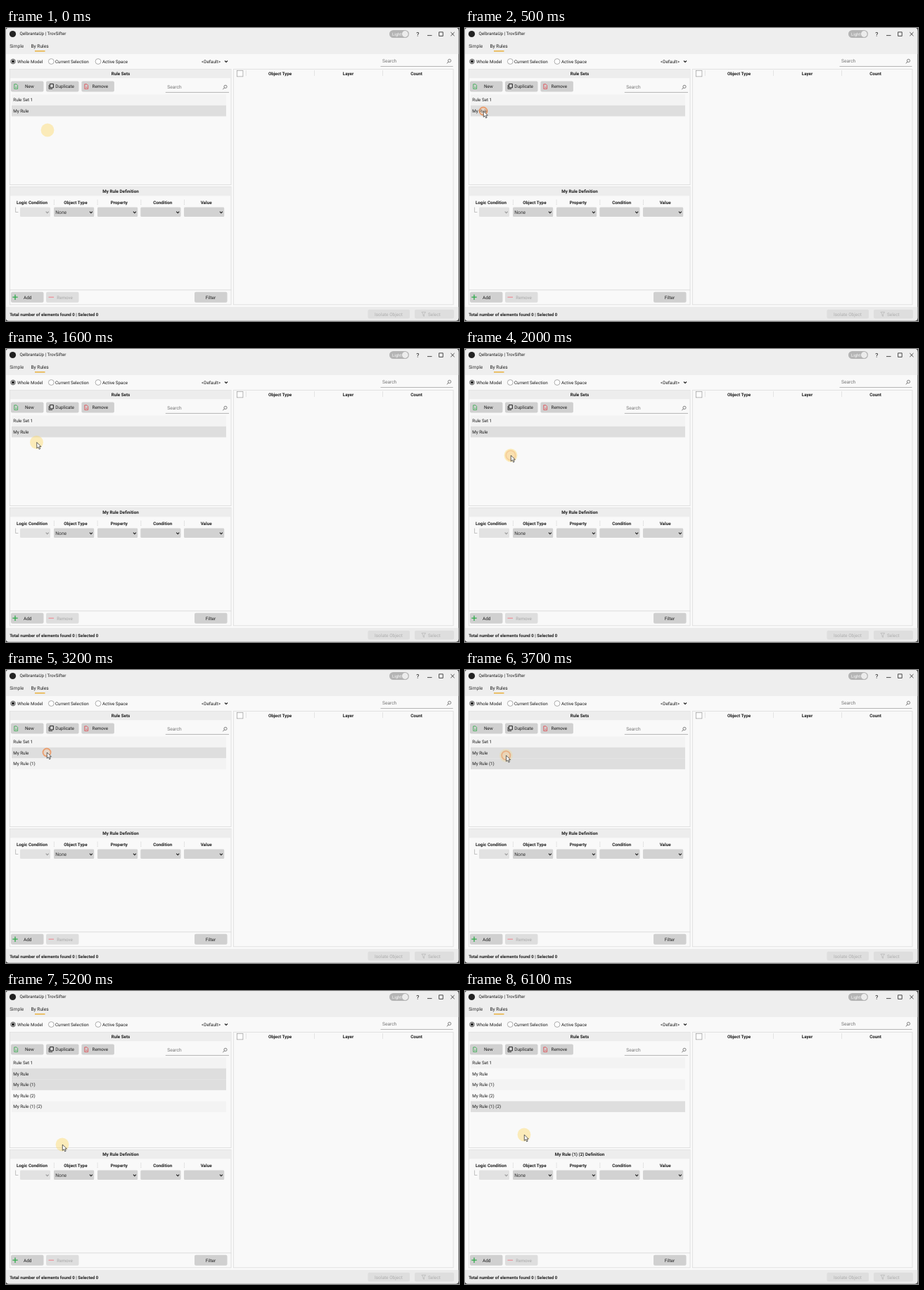
An HTML page that plays this animation: 644x416 px, repeating every 6.9 s.

```html
<!DOCTYPE html>
<html lang="en">
<head>
<meta charset="utf-8">
<title>Rule sets</title>
<style>
html, body { margin: 0; width: 100%; height: 100%; overflow: hidden; background: #4a4a4a; }
svg { display: block; font: 6.25px Roboto, sans-serif; text-rendering: geometricPrecision; white-space: pre; }
</style>
</head>
<body>
<svg id="stage" width="644" height="416" viewBox="0 0 644 416"></svg>
<script>
const stage = document.getElementById('stage');

const rect = (x, y, w, h, fill, more = '') =>
  `<rect x="${x}" y="${y}" width="${w}" height="${h}" fill="${fill}" ${more}/>`;
const path = (d, color = '#222', width = 0.8, more = '') =>
  `<path d="${d}" fill="none" stroke="${color}" stroke-width="${width}" ${more}/>`;
const circle = (x, y, r, fill, more = '') =>
  `<circle cx="${x}" cy="${y}" r="${r}" fill="${fill}" ${more}/>`;
const text = (x, y, s, more = '') =>
  `<text x="${x}" y="${y}" fill="#1c1c1c" ${more}>${s}</text>`;
const head = (x, y, s) => text(x, y, s, 'text-anchor="middle" font-weight="700"');
const label = (x, y, s, color = '#1c1c1c', size = 6.4) =>
  text(x, y, s, `style="fill:${color};font-size:${size}px"`);
const frame = (x, y, w, h) =>
  rect(x, y, w, h, '#f9f9f9', 'stroke="#dcdcdc" stroke-width=".8"');
const button = (x, y, w = 46.5, h = 15, fill = '#d0d0d0', more = '') =>
  rect(x, y, w, h, fill, 'rx="2" ' + more);
const divider = (x, y) => path(`M${x} ${y}v8`, '#c4c4c4', 0.8, 'stroke-dasharray="1 1"');
const chevron = (x, y, color = '#222') => path(`M${x - 2} ${y - 1}l2 2l2-2`, color, 1.1);
const radio = (x, on) =>
  circle(x, 47.5, on ? 3.3 : 3.9, '#fff', `stroke="${on ? '#222' : '#999'}" stroke-width=".8"`) +
  (on ? circle(x, 47.5, 2, '#111') : '');
const search = (x, y, end) =>
  label(x + 2.5, y - 5.5, 'Search', '#777', 6.6) +
  path(`M${x} ${y - 0.2}H${end}`, '#999', 0.7) +
  circle(end - 5, y - 8.3, 2.1, 'none', 'stroke="#555" stroke-width=".7"') +
  path(`M${end - 6.5} ${y - 6.8}l-2.2 2.4`, '#555', 0.8);
const sheet = (x, color) =>
  path(`M${x} 79.8h3.2l1.6 1.6v5h-4.8z`, color, 0.8) +
  path(`M${x + 1.4} 84.2h2.2`, color, 0.8);
const dropdown = (x, w, off) =>
  rect(x, 254.6, w, 13.4, off ? '#e2e2e2' : '#d2d2d2', 'rx="1.5"') +
  chevron(x + w - 4.3, 261.6, off ? '#999' : '#222');

const titleBar =
  rect(0, 0, 643.3, 415.6, '#f9f9f9', 'rx="4"') +
  '<path d="M0 37V4a4 4 0 0 1 4-4H639.3a4 4 0 0 1 4 4V37z" fill="#eeeeee"/>' +
  circle(9.5, 8.5, 4.6, '#222') +
  text(19.5, 10.3, 'QelbrantaUp | TrovSifter', 'font-size="6.25"') +
  rect(545, 3, 28, 11, '#b4b4b4', 'rx="5.5"') +
  label(549, 10.6, 'Light', '#f8f8f8', 6) + circle(567.3, 8.5, 4.4, '#ececec') +
  label(583.3, 11.5, '?', '#222', 8.5) +
  path('M599 10.6h6.5M615.6 5.8h5.6v5.6h-5.6zM632.3 6l5.2 5.2m0-5.2l-5.2 5.2');

const tabs =
  label(5.2, 28, 'Simple', '#333', 6.6) + label(35.5, 28, 'By Rules', '#1c1c1c', 6.6) +
  rect(41, 32, 14.5, 1.5, '#e9b13f') +
  radio(10, true) + text(16, 49.8, 'Whole Model') +
  radio(64.3) + text(70, 49.8, 'Current Selection') +
  radio(131) + text(137, 49.8, 'Active Space') +
  label(278, 49.8, '&lt;Default&gt;', '#1c1c1c', 6.4) + chevron(313, 47.5) +
  search(532.5, 54.7, 635.5);

const panels =
  frame(5.5, 58.4, 314.5, 164.2) + rect(5.9, 58.8, 313.7, 12.4, '#ededed') + head(163, 67.2, 'Rule Sets') +
  frame(5.5, 225.4, 314.5, 146.6) + rect(5.9, 225.8, 313.7, 12.6, '#ededed') +
  frame(5.5, 372, 314.5, 20.8) + frame(323.4, 58.4, 312.6, 334.4) +
  rect(328.3, 60.3, 8.6, 8.6, '#fdfdfd', 'stroke="#999" stroke-width=".7"') +
  [[389.5, 'Object Type'], [486.5, 'Layer'], [583.5, 'Count']].map(([x, s]) => head(x, 66.8, s)).join('') +
  [341.3, 438.5, 535.5].map(x => divider(x, 60.5)).join('');

const toolbar =
  button(7, 75.6) + sheet(11.8, '#2faa4a') + label(27, 85.3, 'New') +
  button(57, 75.6, 46.5, 15, '#d0d0d0', 'id="copy"') +
  path('M62.4 79.4h5v5.4h-5z', '#222', 1) + path('M61 81v5.4h5', '#222', 0.8) +
  label(70.3, 85.3, 'Duplicate') +
  button(107.4, 75.6) + sheet(111.8, '#e0434b') + label(122.5, 85.3, 'Remove', '#1c1c1c', 6.3) +
  search(226.8, 91.6, 317);

const columns = ['Logic Condition', 'Object Type', 'Property', 'Condition', 'Value'];
const definition =
  columns.map((s, i) => head(37 + 61.9 * i, 250.3, s) + (i ? divider(6.7 + 61.7 * i, 244) : '')).join('') +
  path('M13.6 254.5v7h3.8', '#aaa', 0.7) + dropdown(20, 43, true) +
  [68, 130, 191.3, 253].map(x => dropdown(x, 57.2)).join('') +
  label(70.3, 263.9, 'None', '#333', 6.7) +
  button(7, 374.8) + path('M9.3 382.2h7.4m-3.7-3.7v7.4', '#2faa4a', 1.3) + label(25, 384.6, 'Add') +
  button(57, 374.8, 46.5, 15, '#dedede') + path('M60.5 382.2h7.5', '#ee8f98', 1.2) +
  label(72.3, 384.6, 'Remove', '#a8a8a8', 6.3) +
  button(268, 374.8) + label(283.8, 384.6, 'Filter');

const statusBar =
  `<path d="M0 396H643.3V411.6a4 4 0 0 1-4 4H4a4 4 0 0 1-4-4z" fill="#ebebeb"/>` +
  text(5.2, 409.2, 'Total number of elements found 0 | Selected 0', 'font-weight="700" font-size="6.1"') +
  button(514.5, 399.8, 59.5, 12.8, '#dedede') + label(524, 408.6, 'Isolate Object', '#aeaeae', 6.5) +
  button(581, 399.8, 56, 12.8, '#dedede') + label(600, 408.6, 'Select', '#aeaeae', 6.4) +
  path('M591 403.3h5.6l-2.2 3v3l-1.4-.9v-2.1z', '#b5b5b5', 0.7);

stage.innerHTML = titleBar + tabs + panels + toolbar + definition + statusBar +
  '<g id="rows"></g><g id="name"></g><g id="pointer"></g>';
const [copy, rows, name, pointer] =
  ['copy', 'rows', 'name', 'pointer'].map(id => document.getElementById(id));

// Pointer stops: time, x, y
const stops = [
  [0, 59, 145], [100, 59, 145], [500, 26, 118], [800, 24, 117], [1200, 22, 114], [1400, 22, 114],
  [1800, 65, 151], [2200, 65, 151], [2700, 86, 86], [2800, 86, 86], [3100, 58, 117], [3200, 58, 117],
  [3500, 57, 133], [3600, 57, 133], [3900, 62, 88], [4200, 62, 165.5], [4600, 62, 165.5],
  [5200, 80, 218], [5600, 72, 165], [5800, 72, 165], [6100, 84, 204], [6900, 84, 204]
];
const clicks = [500, 700, 1800, 2700, 3200, 3600, 3900, 5600];
const names = ['Rule Set 1', 'My Rule', 'My Rule (1)', 'My Rule (2)', 'My Rule (1) (2)'];
const between = (t, a, b) => t >= a && t < b;

function tick(t) {
  const step = n => Math.floor(t / n) * n;
  if (t < 3900) return step(100);
  if (t < 4200) return 3900;
  return t < 6000 ? step(200) : Math.min(step(100), 6100);
}

function pointerAt(t) {
  const i = stops.findIndex(s => s[0] > t);
  const [t0, x0, y0] = stops[i - 1], [t1, x1, y1] = stops[i];
  const p = (t - t0) / (t1 - t0), e = p * p * (3 - 2 * p);
  return [x0 + (x1 - x0) * e, y0 + (y1 - y0) * e];
}

function drawRows(t) {
  const count = t < 2900 ? 2 : t < 4400 ? 3 : 5;
  const picked = t >= 5600 ? [4] : t >= 3600 ? [1, 2] : [1];
  const editing = between(t, 700, 1600);
  rows.innerHTML = names.slice(0, count).map((s, i) => {
    const y = 94.4 + 15.5 * i;
    if (editing && i === 1)
      return rect(8.5, 110.5, 304, 14, '#e2e2e2', 'stroke="#a4a4a4"') +
        rect(10.5, 111.5, 295, 12, '#fff', 'stroke="#8a8a8a"') +
        text(13.3, y + 9.6, s);
    const fill = picked.includes(i) ? '#dedede' : i % 2 ? '#f9f9f9' : '#f3f3f3';
    return rect(8, y, 305, 15.5, fill) + text(10.3, y + 9.6, s);
  }).join('');
  name.innerHTML = head(163, 234.3, (t >= 5600 ? names[4] : names[1]) + ' Definition');
}

function drawPointer(t) {
  const [x, y] = pointerAt(t);
  const age = Math.min(...clicks.filter(c => c <= t).map(c => t - c), 999);
  // A click swaps the halo for a ring, then the halo returns.
  const halo = Math.min(age / 200, 1);
  let s = circle(x, y, 9.4, '#ffd65a', `opacity="${0.4 * halo}"`);
  if (age < 300)
    s += circle(x, y, 5.5 + age / 150, '#f9c79a',
      `fill-opacity=".3" stroke="#ec8a4c" stroke-width="1.8" stroke-opacity="${0.75 - age / 400}"`);
  if (t >= 100)
    s += `<path transform="translate(${x + 0.3} ${y})" d="M0 0v8.4l2-1.8l1.4 3.2l1.5-.7l-1.4-3h2.6z" fill="#fff" stroke="#222" stroke-width=".7"/>`;
  pointer.innerHTML = s;
}

let last = -1;
function draw() {
  const t = tick(performance.now() % 6900);
  if (t !== last) {
    last = t;
    copy.setAttribute('fill', between(t, 2600, 3000) || between(t, 3900, 4400) ? '#c4c4c4' : '#d0d0d0');
    drawRows(t);
    drawPointer(t);
  }
  requestAnimationFrame(draw);
}
draw();
</script>
</body>
</html>
```
